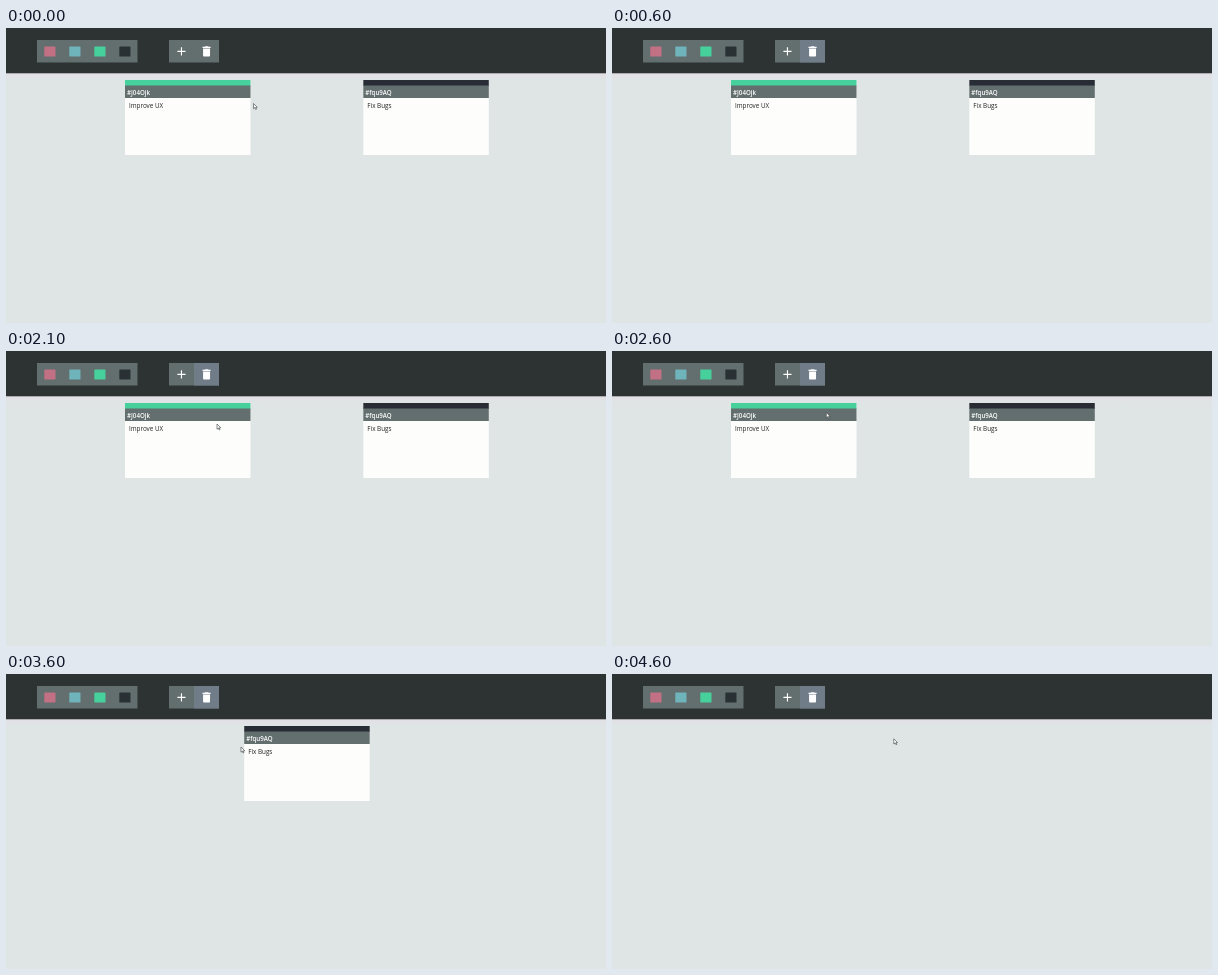
Animation, 600 px wide and 295 px high, one loop 7.6 s. Source, as an HTML page:

```html
<!DOCTYPE html>
<html lang="en">
<head>
<meta charset="utf-8">
<title>Note board</title>
<style>
  html, body { margin: 0; width: 100%; height: 100%; overflow: hidden; background: #dfe5e5; }
  svg { display: block; width: 600px; height: 295px; }
  text { font-family: "Open Sans", "Noto Sans", sans-serif; font-size: 6.3px; fill: #222; }
  .id { font-size: 6.2px; font-weight: 600; fill: #fff; }
</style>
</head>
<body>
<svg viewBox="0 0 600 295">
  <defs>
    <linearGradient id="shade" x2="0" y2="1">
      <stop stop-color="#e3dfe6"/>
      <stop offset="1" stop-color="#dfe5e5"/>
    </linearGradient>
  </defs>
  <rect width="600" height="295" fill="#dfe5e5"/>
  <rect y="45" width="600" height="7" fill="url(#shade)"/>
  <rect width="600" height="45.3" fill="#2d3232"/>
  <rect x="31" y="12" width="100.5" height="22.5" fill="#636e6e"/>
  <g id="swatches"></g>
  <rect x="163" y="12" width="50" height="22.5" fill="#636e6e"/>
  <rect id="hover" x="188" y="12" width="25" height="22.5" fill="#707c88"/>
  <g fill="#fff">
    <path transform="translate(168.5 16.4) scale(.58)" d="M19 13h-6v6h-2v-6H5v-2h6V5h2v6h6z"/>
    <path transform="translate(193.6 16.4) scale(.58)" d="M6 19c0 1.1.9 2 2 2h8c1.1 0 2-.9 2-2V7H6zM19 4h-3.5l-1-1h-5l-1 1H5v2h14z"/>
  </g>
  <g id="cards"></g>
  <path id="cursor" d="M0 0V5.2L1.3 4.1L2.2 6L3 5.6L2.2 3.8H3.8Z" fill="#fff" stroke="#3a3f40" stroke-width=".6"/>
</svg>
<script>
const LOOP = 7600, STEP = 100;
const byId = id => document.getElementById(id);

function add(parent, tag, attrs, label) {
  const el = document.createElementNS("http://www.w3.org/2000/svg", tag);
  for (const key in attrs) el.setAttribute(key, attrs[key]);
  if (label) el.textContent = label;
  return parent.appendChild(el);
}

function makeCard(color, id, note) {
  const card = add(byId("cards"), "g", {});
  add(card, "rect", { y: 52, width: 125.5, height: 75, fill: "#fdfefc" });
  add(card, "rect", { y: 52, width: 125.5, height: 6, fill: color });
  add(card, "rect", { y: 57.5, width: 125.5, height: 12.5, fill: "#636e6e" });
  add(card, "text", { x: 2, y: 66.6, class: "id" }, id);
  add(card, "text", { x: 4, y: 80.2 }, note);
  return card;
}

["#c27083", "#70b4bb", "#46d09b", "#2a3135"].forEach((fill, i) =>
  add(byId("swatches"), "rect", { x: 38.3 + 25 * i, y: 18.5, width: 11.2, height: 10, rx: .6, fill }));

const uxCard = makeCard("#46d09b", "#J04Ojk", "Improve UX");
const bugCard = makeCard("#272c35", "#fqu9AQ", "Fix Bugs");

// Cursor stops: time, x, y
const route = [
  [0, 247.5, 75.5], [500, 203, 26], [1500, 203, 26], [1600, 204.5, 31],
  [2000, 210, 69], [2100, 211, 73], [2200, 212, 69], [2300, 212, 69],
  [2600, 214.3, 61.6], [3300, 214.3, 61.6], [3600, 235, 73],
  [4000, 281.8, 64.8], [LOOP, 281.8, 64.8]
];

function cursorAt(t) {
  const i = route.findIndex(stop => stop[0] > t);
  const [t0, x0, y0] = route[i - 1], [t1, x1, y1] = route[i];
  const k = (t - t0) / (t1 - t0);
  return [x0 + (x1 - x0) * k, y0 + (y1 - y0) * k];
}

function show(el, visible) {
  el.setAttribute("visibility", visible ? "visible" : "hidden");
}

function render(time) {
  const t = Math.floor((time % LOOP) / STEP) * STEP;
  show(byId("hover"), t >= 500);
  show(uxCard, t < 3100);
  show(bugCard, t < 4600);
  uxCard.setAttribute("transform", "translate(119 0)");
  bugCard.setAttribute("transform", `translate(${t < 3100 ? 357.3 : 238.2} 0)`);
  show(byId("cursor"), t < 600 || t >= 1600);
  byId("cursor").setAttribute("transform", `translate(${cursorAt(t)})`);
}

const start = performance.now();
function tick() {
  render(performance.now() - start);
  requestAnimationFrame(tick);
}
tick();
</script>
</body>
</html>
```
